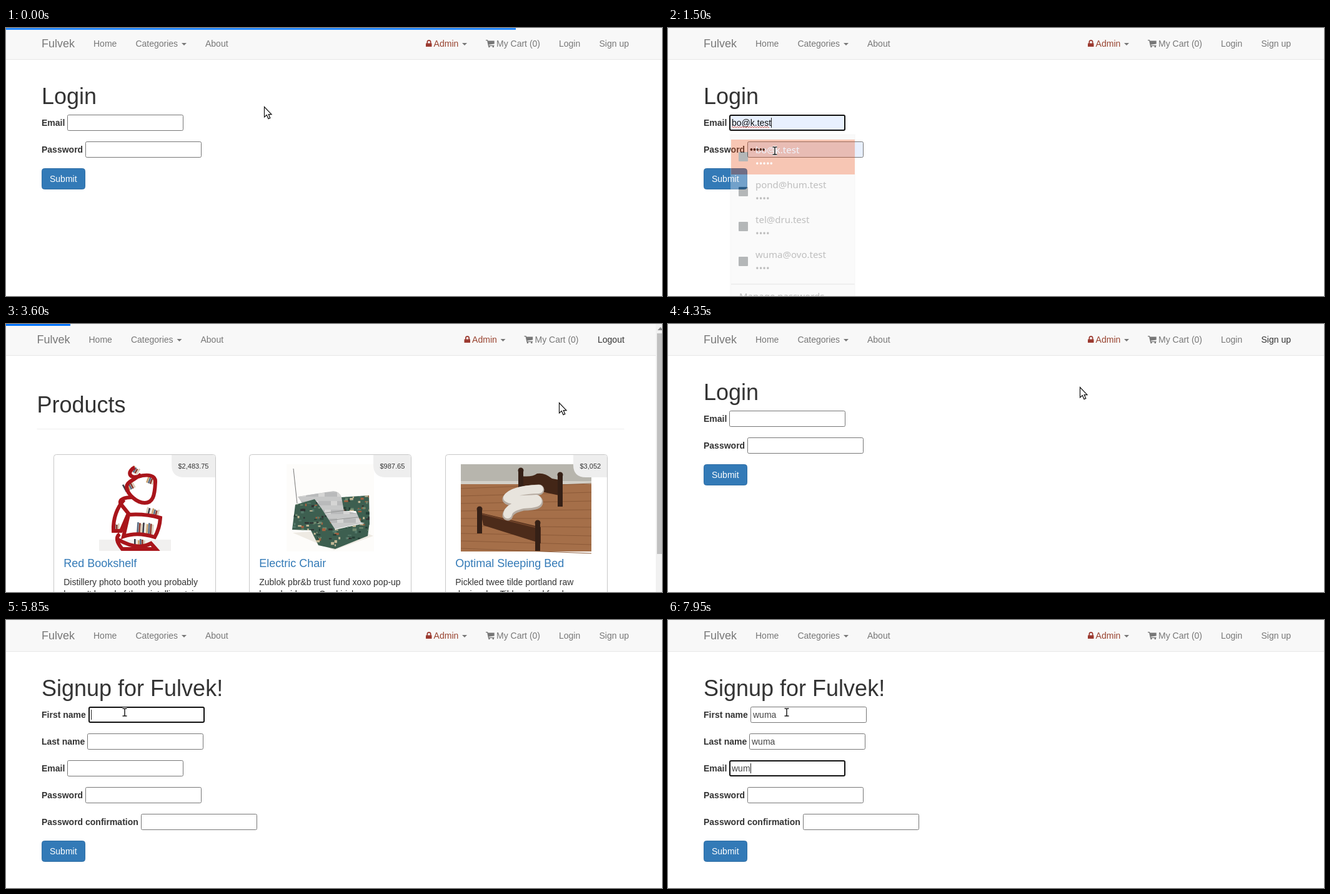
These frames come from a looping animation (1050 px wide and 430 px high, 8000 ms). An HTML page:

```html
<!DOCTYPE html>
<html lang="en">
<head>
<meta charset="utf-8">
<title>Shop login</title>
<style>
  html, body { margin: 0; width: 100%; height: 100%; overflow: hidden; background: #fff; }
  svg { display: block; width: 1050px; height: 430px; font: 14px "Liberation Sans", Arial, sans-serif; }
  text { white-space: pre; }
  .menu { font: 15px "Noto Sans", sans-serif; }
</style>
</head>
<body>
<svg id="stage" viewBox="0 0 1050 430"></svg>
<script>
const LOOP = 8000, TICK = 150;
const SHOP = 'Fulvek';
const EMAIL = 'bo@k.test';
const ACCOUNTS = [[EMAIL, 5], ['pond@hum.test', 4], ['tel@dru.test', 4], ['wuma@ovo.test', 4]];
const stage = document.getElementById('stage');
const measure = document.createElement('canvas').getContext('2d');
measure.font = '14px "Liberation Sans", Arial, sans-serif';

const esc = s => s.replace(/&/g, '&amp;').replace(/</g, '&lt;');
const text = (x, y, s, fill = '#777', extra = '') => `<text x="${x}" y="${y}" fill="${fill}" ${extra}>${esc(s)}</text>`;
const rect = (x, y, w, h, fill, extra = '') => `<rect x="${x}" y="${y}" width="${w}" height="${h}" fill="${fill}" ${extra}/>`;
const path = (d, fill, extra = '') => `<path d="${d}" fill="${fill}" ${extra}/>`;
const line = (d, stroke, width) => path(d, 'none', `stroke="${stroke}" stroke-width="${width}"`);
const group = (x, y, body, extra = '') => `<g transform="translate(${x} ${y})" ${extra}>${body}</g>`;
const size = px => `font-size="${px}"`;
const bullets = n => '•'.repeat(n);
// Latest entry whose time has been reached.
const latest = (keys, t) => keys.reduce((found, key) => key[0] <= t ? key : found, keys[0]);

function seeded(seed) {
  return () => (seed = (seed * 16807) % 2147483647) / 2147483647;
}

/* Navigation */
const caretDown = x => path(`M${x} 24h8l-4 4z`, '#777');
const lock = x => path(`M${x} 24.5h1.5v-2a3.5 3.5 0 0 1 7 0v2h1v5.5h-9.5zM${x + 3.2} 24.5h3.6v-2a1.8 1.8 0 0 0-3.6 0z`, '#9c3a30', 'fill-rule="evenodd"');
const cart = x => path(`M${x} 19h3l.5 1.5h10.2v5l-9 1.2.4 1.1h8.4v1.2h-9.6l-1.8-8.8h-2.1z`, '#777')
  + `<circle cx="${x + 5.4}" cy="30" r="1.3" fill="#777"/><circle cx="${x + 11.8}" cy="30" r="1.3" fill="#777"/>`;

function navbar(loggedIn, hover) {
  const left = loggedIn ? -7.5 : 0, right = loggedIn ? 61.5 : 0;
  const links = loggedIn ? [[947, 'Logout']] : [[885, 'Login'], [949.5, 'Sign up']];
  return rect(0, 0, 1050, 50, '#f8f8f8') + rect(0, 50, 1050, 1, '#e7e7e7')
    + group(left, 0, text(57, 31, SHOP, '#777', size(18)) + text(140, 30, 'Home')
      + text(207.4, 30, 'Categories') + caretDown(281) + text(319, 30, 'About'))
    + group(right, 0, lock(672) + text(684.6, 30, 'Admin', '#98432f') + caretDown(730)
      + cart(768) + text(785, 30, 'My Cart (0)'))
    + links.map(([x, s]) => text(x, 30, s, s === hover ? '#333' : '#777')).join('');
}

/* Forms */
function field(row, label, x, o = {}) {
  const y = 139 + 43 * row, value = o.value || '';
  const fill = o.filled ? '#e8f0fe' : '#fff';
  const box = o.focus
    ? rect(x + 1, y + 1, 184, 24, fill, 'rx="2" stroke="#101010" stroke-width="2"')
    : rect(x + .5, y + .5, 185, 25, fill, 'rx="2" stroke="#767676"');
  const end = Math.round(x + 4 + measure.measureText(value).width);
  return text(57, y + 18, label, '#333', 'font-weight="bold"') + box
    + text(x + 4, y + 18, value, o.filled ? '#111' : '#444')
    + (o.caret ? rect(end, y + 5, 1, 16, '#222') : '');
}

function submit(row, state) {
  const y = 139 + 43 * row;
  const body = state === 'focus'
    ? rect(57.5, y + .5, 69, 33, '#fff', 'rx="4" stroke="#14202c"')
      + rect(60, y + 3, 64, 28, '#286090', 'rx="2" stroke="#101010" stroke-width="2"')
    : rect(57.5, y + .5, 69, 33, state === 'hover' ? '#286090' : '#337ab7', `rx="4" stroke="${state === 'hover' ? '#204d74' : '#2e6da4'}"`);
  return body + text(70, y + 22, 'Submit', '#fff');
}

const heading = (x, y, s) => text(x, y, s, '#333', size(36));

function accountMenu(opacity, highlighted) {
  const items = ACCOUNTS.map(([mail, length], i) => {
    const y = 179 + 56 * i, active = highlighted && i === 0;
    const color = active ? '#fff' : '#3d3d3d';
    return (active ? rect(101, y, 198, 56, '#e95420') : '') + rect(113, y + 20, 15, 15, '#20282c', 'rx="1"')
      + text(140, y + 22, mail, color) + text(140, y + 44, bullets(length), color);
  }).join('');
  return `<g class="menu" opacity="${opacity}">`
    + rect(98, 170, 203, 280, '#000', 'opacity=".03"')
    + rect(100.5, 171.5, 198, 280, '#f2f2f2', 'stroke="#e4e4e4"')
    + items + rect(101, 410, 198, 2, '#d0d0d0') + text(114, 436, 'Manage passwords', '#3d3d3d') + '</g>';
}

function loginPage(t) {
  const first = t < 3000;
  const filled = first && t >= 900;
  const focus = first && t >= 300 && t < 2250;
  const button = !first || t < 1800 ? '' : t < 2250 ? 'hover' : 'focus';
  const hover = t >= 4050 ? 'Sign up' : '';
  const menuOpacity = t < 450 || t >= 1650 ? 0 : t < 1500 ? 1 : .33;
  const squiggle = 'M102 159' + 'q1-2 2 0t2 0'.repeat(15);
  return navbar(false, hover) + heading(57, 122, 'Login')
    + field(0, 'Email', 98, { value: filled ? EMAIL : '', filled, focus, caret: focus })
    + (t >= 1500 && t < 2250 ? line(squiggle, '#e0523f', .9) : '')
    + field(1, 'Password', 127, { value: filled ? bullets(5) : '', filled })
    + submit(2, button)
    + (first && menuOpacity ? accountMenu(menuOpacity, t >= 900) : '');
}

function signupPage(t) {
  const typed = keys => latest([[0, ''], ...keys], t)[1];
  const firstName = typed([[6000, 'w'], [6150, 'wu'], [6300, 'wuma']]);
  const lastName = typed([[6600, 'w'], [6750, 'wu'], [6900, 'wum'], [7050, 'wuma']]);
  const email = typed([[7500, 'w'], [7650, 'wu'], [7800, 'wum']]);
  const active = latest([[0, -1], [4950, 0], [6450, 1], [7200, 2]], t)[1];
  const caret = t < 5400 || t >= 5850;
  const rows = [['First name', 132, firstName], ['Last name', 130, lastName], ['Email', 98, email],
    ['Password', 127, ''], ['Password confirmation', 216, '']];
  return navbar(false) + heading(57, 122, `Signup for ${SHOP}!`)
    + rows.map(([label, x, value], i) => field(i, label, x, { value, focus: i === active, caret: caret && i === active })).join('')
    + submit(5);
}

/* Products */
function books(x, y, count, height, angle) {
  const colors = ['#3b3a45', '#d8cdb8', '#8a3b2c', '#566a82', '#c9a06a', '#ece7dc'];
  let body = '';
  for (let i = 0; i < count; i++) body += rect(i * 3, -height + i % 3, 2.6, height - i % 3, colors[(i * 5 + count) % 6]);
  return `<g transform="translate(${x} ${y}) rotate(${angle})">${body}</g>`;
}

function bookshelf() {
  const red = d => line(d, '#a9151b', 6);
  return rect(149, 346, 115, 18, '#f1f0ef')
    + books(200, 236, 4, 10, 30) + books(192, 270, 6, 13, -28) + books(224, 254, 4, 11, 20)
    + books(223, 306, 7, 13, 14) + books(209, 336, 9, 18, 4) + books(170, 331, 4, 11, 0) + books(205, 361, 6, 16, 0)
    + red('M206 230C194 236 196 248 211 245C228 240 240 243 239 254C238 276 235 287 222 287C210 287 194 274 193 261C194 252 207 250 216 241')
    + red('M202 278C190 278 181 281 183 288L196 304L184 332H172C171 312 178 294 189 282')
    + red('M196 306Q222 304 247 311Q246 328 238 342Q210 333 188 341Z')
    + red('M182 337Q172 344 186 361H240L232 352Q210 364 178 345');
}

function chair() {
  const random = seeded(41);
  const colors = ['#263f36', '#6f8a70', '#a6603f', '#c4b896', '#303332', '#54796a'];
  let parts = '';
  for (let i = 0; i < 190; i++) {
    parts += rect(458 + random() * 124, 272 + random() * 86, 2 + random() * 5, 1.5 + random() * 3, colors[i % 6]);
  }
  const frame = 'M463 290L494 281L505 296L527 330L582 318L579 340L527 361L500 355L488 331L458 330ZM537 278L581 275L582 322L568 318L560 300L541 300Z';
  let checks = '';
  for (let i = 0; i < 40; i++) checks += rect(470 + i % 10 * 10, 270 + (i / 10 | 0) * 14, 10, 7, i % 3 ? '#b9babb' : '#d5d5d4');
  return rect(449, 225, 140, 140, '#fdfcfa') + path('M459 335L525 363L588 340L560 328Z', '#eeeae3')
    + line('M460 232L466 288', '#777', 1)
    + `<clipPath id="cushion"><path d="M467 277L524 268Q533 268 537 278L543 300L572 306L573 319L526 329L497 306L475 289Z"/></clipPath>`
    + `<g clip-path="url(#cushion)">${rect(460, 260, 120, 75, '#c7c8c8')}${checks}</g>`
    + line('M497 305L543 299M507 316L572 309', '#929493', 1)
    + path(frame, '#3d5f50') + `<clipPath id="frame"><path d="${frame}"/></clipPath><g clip-path="url(#frame)">${parts}</g>`;
}

function bed() {
  let planks = '';
  for (let i = 0; i < 9; i++) planks += `M728 ${264 + i * 12}L937 ${256 + i * 14}`;
  const post = (x, y, h) => rect(x, y + 5, 8, h, '#352016') + `<circle cx="${x + 4}" cy="${y + 4}" r="4.5" fill="#352016"/>`;
  return rect(728, 225, 209, 140, '#a56f49') + rect(728, 225, 209, 29, '#b7b5ad') + rect(728, 252, 209, 5, '#d3d0c8')
    + line(planks, '#8c5a38', 1)
    + path('M825 244Q842 246 850 240Q862 238 874 248L890 251V276L862 270L825 260Z', '#432617')
    + post(820, 231, 31) + post(883, 238, 50)
    + path('M760 303L856 326V352L764 323Z', '#4c2b1a') + line('M762 305L855 328', '#704329', 2)
    + post(754, 293, 38) + post(847, 315, 44)
    + `<g stroke-linecap="round" stroke-linejoin="round">${line('M853 266Q811 268 803 281Q807 286 849 283Q858 290 828 291Q805 296 803 307', '#b5aaa0', 17)}`
    + line('M853 265Q811 266 803 279Q807 284 849 281Q857 288 828 289Q805 294 803 305', '#e8e4dd', 14) + '</g>';
}

function card(x, price, tagWidth, title, lines, picture) {
  const right = x + 259, left = right - tagWidth;
  return rect(x + .5, 209.5, 259, 300, '#fff', 'rx="4" stroke="#c8c8c8"') + picture
    + path(`M${left} 210H${right - 3}q3 0 3 3V246H${left + 20}q-20 0-20-20z`, '#eee')
    + text(left + 10.5, 232, price, '#333', size(11)) + text(x + 16.2, 390, title, '#337ab7', size(18))
    + lines.map((s, i) => text(x + 16.2, 419 + 19 * i, s, '#333')).join('');
}

const productsPage = t => navbar(true, t >= 3300 ? 'Logout' : '') + heading(49.5, 142, 'Products')
  + rect(49.5, 168, 940, 1, '#eee')
  + card(76, '$2,483.75', 70, 'Red Bookshelf', ['Distillery photo booth you probably', "haven't heard of them intelligentsia"], bookshelf())
  + card(389, '$987.65', 60, 'Electric Chair', ['Zublok pbr&b trust fund xoxo pop-up', 'lomo heirloom. Cred irish vegan'], chair())
  + card(703, '$3,052', 54, 'Optimal Sleeping Bed', ['Pickled twee tilde portland raw', 'denim vhs. Tilde mixed food'], bed())
  + rect(1040, 0, 10, 430, '#f1f1f1') + rect(1042, 15, 8, 354, '#c1c1c1') + path('M1043 10l4.5-5 4.5 5z', '#8a8a8a');

/* Pointer: time, shape, x, y */
const POINTER = [
  [0, 'arrow', 413, 126], [150, 'arrow', 320, 140], [300, 'beam', 190, 151],
  [900, 'arrow', 174, 180], [1050, 'arrow', 171, 191], [1500, 'beam', 171, 197],
  [1650, 'beam', 150, 204], [1800, 'hand', 112, 236], [1950, 'hand', 98, 241],
  [2400, 'arrow', 160, 330], [2550, 'arrow', 229, 412],
  [3000, 'arrow', 500, 270], [3150, 'arrow', 820, 110], [3300, 'hand', 967, 24],
  [3600, 'arrow', 885, 126], [3750, 'arrow', 880, 120], [3900, 'arrow', 930, 70],
  [4050, 'hand', 973, 25], [4200, 'arrow', 961, 64], [4350, 'arrow', 659, 101],
  [4500, 'arrow', 413, 134], [4650, 'arrow', 330, 145], [4800, 'beam', 250, 149], [4950, 'beam', 190, 148]
];
const BEAM = 'M-3.5 -6H-1.5Q0 -6 0 -4.5Q0 -6 1.5 -6H3.5M0 -5V5M-3.5 6H-1.5Q0 6 0 4.5Q0 6 1.5 6H3.5';
const SHAPES = {
  arrow: path('M.5 .5V17L4.3 13.6L7 19.6L9.8 18.4L7.2 12.6H12Z', '#fff', 'stroke="#111" stroke-width="1.2"'),
  beam: line(BEAM, '#fff', 3.6) + line(BEAM, '#222', 1.5),
  hand: path('M-1.5 1Q0-1 1.5 1V7L8 8.5Q10 9 10 11L9 18H0L-5 11Q-5 9-3 9.5L-1.5 11Z', '#fff', 'stroke="#111" stroke-width="1.2"')
};

/* Progress bar: time, width, opacity */
const PROGRESS = [[0, 816, .84], [150, 0, 0], [3600, 103, 1], [3750, 816, .84], [3900, 0, 0]];

function scene(t) {
  const page = t < 2850 || (t >= 3750 && t < 4500) ? loginPage : t < 3750 ? productsPage : signupPage;
  const [, width, opacity] = latest(PROGRESS, t);
  const [, shape, x, y] = latest(POINTER, t);
  return rect(0, 0, 1050, 430, '#fff') + page(t)
    + rect(0, 0, width, 3, '#0076ff', `opacity="${opacity}"`) + group(x, y, SHAPES[shape]);
}

let shown = -1;
function frame(now) {
  const tick = Math.floor((now % LOOP) / TICK);
  if (tick !== shown) stage.innerHTML = scene((shown = tick) * TICK);
  requestAnimationFrame(frame);
}
frame(0);
</script>
</body>
</html>
```
